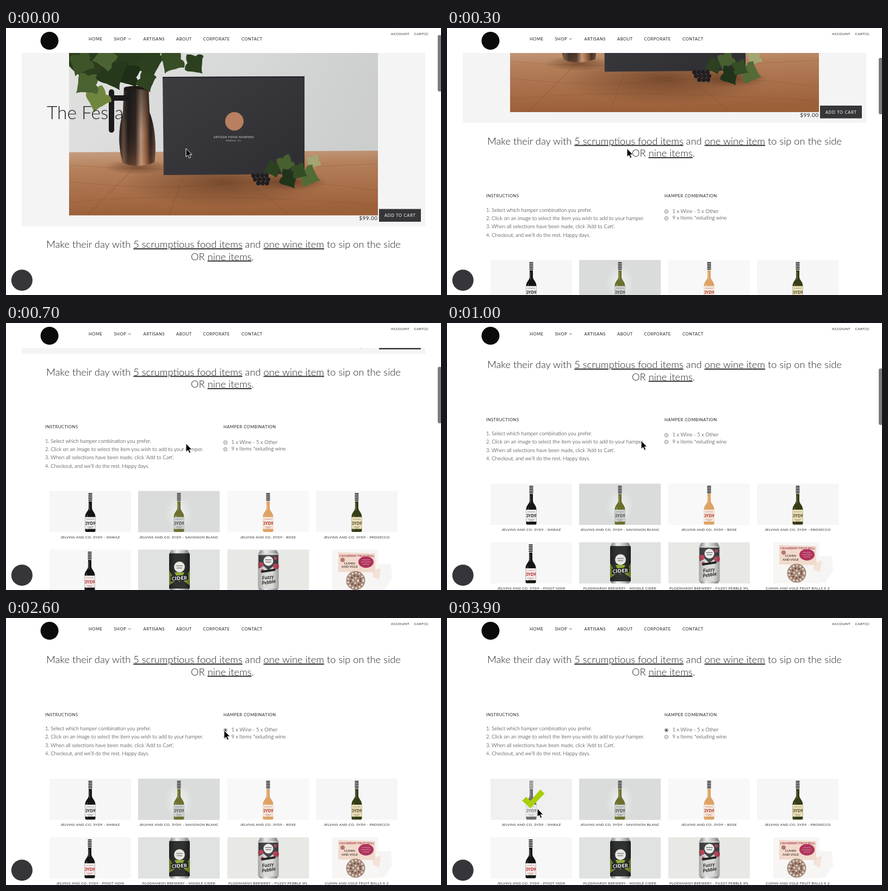
Write an HTML page that moves like this. It is 800 px wide and 492 px high and loops after 4000 ms.

```html
<!DOCTYPE html>
<html lang="en">
<head>
<meta charset="utf-8">
<title>Hamper shop</title>
<style>
  html, body { margin: 0; width: 100%; height: 100%; overflow: hidden; background: #fff; }
  svg { display: block; width: 800px; height: 492px; }
  text { font-family: Lato, sans-serif; fill: #222; white-space: pre; }
  .nav { font-size: 7.6px; letter-spacing: .5px; }
  .small { font-size: 6.5px; letter-spacing: .35px; }
  .mid { text-anchor: middle; }
  .body { font-size: 9.5px; font-weight: 300; }
  .body text { fill: #111; }
  .lead { font-size: 18.3px; font-weight: 300; text-anchor: middle; }
  .lead tspan { text-decoration: underline; text-decoration-thickness: 1px; text-decoration-skip-ink: none; }
  .title { font-size: 33.5px; font-weight: 300; }
  .price { font-size: 10px; letter-spacing: .5px; text-anchor: end; }
  .button { font-size: 7.5px; letter-spacing: .75px; fill: #fff; }
  .radio { fill: #dcdcdc; stroke: #8a8a8a; stroke-width: .8; }
  .glass { fill: var(--glass); }
  .mark { fill: var(--ink); font-size: 7.2px; font-weight: 900; text-anchor: middle; }
</style>
</head>
<body>
<svg viewBox="0 0 800 492">
  <defs>
    <linearGradient id="wall" x2="1" y2=".3">
      <stop offset="0" stop-color="#e0e0de"/><stop offset=".5" stop-color="#d8dada"/><stop offset="1" stop-color="#cbcecd"/>
    </linearGradient>
    <linearGradient id="wood" x2=".12" y2="1">
      <stop offset="0" stop-color="#c69f82"/><stop offset=".3" stop-color="#b47f5a"/><stop offset="1" stop-color="#9c6039"/>
    </linearGradient>
    <linearGradient id="copper">
      <stop offset="0" stop-color="#1d1a1a"/><stop offset=".12" stop-color="#6d5243"/><stop offset=".24" stop-color="#1f1b1b"/>
      <stop offset=".45" stop-color="#3a2921"/><stop offset=".6" stop-color="#d5ad90"/><stop offset=".74" stop-color="#9a6343"/>
      <stop offset=".86" stop-color="#241c19"/><stop offset="1" stop-color="#6f4b39"/>
    </linearGradient>
    <linearGradient id="dusk" x2="0" y2="1">
      <stop offset="0" stop-color="#17181a" stop-opacity=".65"/><stop offset=".6" stop-color="#17181a" stop-opacity=".15"/><stop offset="1" stop-color="#b0714c" stop-opacity=".35"/>
    </linearGradient>
    <linearGradient id="box" x2="1" y2="1">
      <stop offset="0" stop-color="#3d3d41"/><stop offset="1" stop-color="#2e2e32"/>
    </linearGradient>
    <linearGradient id="steel">
      <stop offset="0" stop-color="#777"/><stop offset=".35" stop-color="#eee"/><stop offset=".7" stop-color="#bbb"/><stop offset="1" stop-color="#777"/>
    </linearGradient>
    <linearGradient id="shade">
      <stop offset="0" stop-opacity=".35"/><stop offset=".3" stop-opacity="0"/><stop offset=".7" stop-opacity="0"/><stop offset="1" stop-opacity=".4"/>
    </linearGradient>
    <radialGradient id="glow">
      <stop offset="0" stop-color="#fff" stop-opacity=".6"/><stop offset="1" stop-color="#fff" stop-opacity="0"/>
    </radialGradient>
    <radialGradient id="shadow">
      <stop offset="0" stop-color="#4f2a14" stop-opacity=".55"/><stop offset="1" stop-color="#4f2a14" stop-opacity="0"/>
    </radialGradient>
    <clipPath id="photo"><path d="M116 30H684V345.5H116Z"/></clipPath>
    <path id="leaf" d="M0-15C5-12 7-8 8-5C13-6 16-3 17 2C12 3 10 8 6 11C4 13 1 16 0 20C-3 15-6 13-8 10C-11 7-15 5-16 0C-13-4-10-5-7-5C-6-9-4-13 0-15Z"/>
    <g id="bottle">
      <path class="glass" d="M-3 18V32C-4 38-9.5 40-9.5 48V73Q-9.5 75.5-7 75.5H7Q9.5 75.5 9.5 73V48C9.5 40 4 38 3 32V18Z"/>
      <path d="M-3.5 4H3.5V19H-3.5Z" fill="#f2f2f2"/>
      <path d="M0 4V19" stroke="#161616" stroke-width="7" stroke-dasharray="1.8 1.2"/>
      <path d="M-5.5 44V72M-1.5 22V36" stroke="#fff" stroke-width="1" opacity=".35"/>
      <path d="M-9.5 48H9.5V70H-9.5Z" fill="var(--label)"/>
      <path d="M-7 52H7M-6 66H6M-4 68H4" stroke="var(--ink)" stroke-width=".8" opacity=".55"/>
      <text class="mark" y="62">3YD9</text>
    </g>
    <g id="can">
      <path d="M-15 2H15L19 9V71L15 76H-15L-19 71V9Z" fill="var(--glass)"/>
      <path d="M-15 1H15L18 7H-18Z" fill="url(#steel)"/>
      <path d="M-18 72H18L15 76H-15Z" fill="url(#steel)"/>
    </g>
  </defs>

  <g id="page">
    <path d="M29 30H771V365.5H29Z" fill="#f4f4f4"/>
    <g clip-path="url(#photo)">
      <path d="M116 30H684V345.5H116Z" fill="url(#wall)"/>
      <path d="M116 229L684 226V345.5H116Z" fill="url(#wood)"/>
      <g fill="none" stroke="#7c4828" opacity=".25">
        <path d="M116 252Q300 270 684 250M116 283Q260 300 400 288T684 300M116 322Q300 300 684 325"/>
        <path d="M325 275L300 345M455 290L520 345M235 258L150 345" stroke-width="1.5"/>
      </g>
      <ellipse cx="400" cy="284" rx="190" ry="48" fill="url(#shadow)"/>
      <ellipse cx="240" cy="256" rx="60" ry="14" fill="url(#shadow)"/>
      <path d="M116 46H285Q270 78 232 82Q196 108 168 96Q140 98 116 70Z" fill="#2c3c1e"/>
      <g fill="#2c401f">
        <use href="#leaf" transform="translate(140 62) scale(1.5) rotate(25)" fill="#3d5528"/>
        <use href="#leaf" transform="translate(262 62) scale(1.7) rotate(-15)"/>
        <use href="#leaf" transform="translate(226 84) scale(1.6) rotate(60)" fill="#1f2e17"/>
        <use href="#leaf" transform="translate(345 64) scale(1.3) rotate(-40)"/>
        <use href="#leaf" transform="translate(307 58) scale(1.5) rotate(30)" fill="#374d25"/>
      </g>
      <path d="M217 110Q225 105 262 109L264 155C275 183 277 220 273 248Q242 259 215 249C206 220 206 185 215 155Z" fill="url(#copper)"/>
      <path d="M217 110Q225 105 262 109L264 155C275 183 277 220 273 248Q242 259 215 249C206 220 206 185 215 155Z" fill="url(#dusk)"/>
      <path d="M217 111Q240 103 262 110L263 116Q240 109 217 117Z" fill="#1e1917"/>
      <path d="M219 129H200M194 118V188" fill="none" stroke="#1c1a1a" stroke-linecap="round" stroke-width="10"/>
      <g fill="#70863f">
        <use href="#leaf" transform="translate(170 127) scale(1.5) rotate(15)"/>
        <use href="#leaf" transform="translate(152 101) scale(1.5) rotate(50)" fill="#4a6230"/>
        <use href="#leaf" transform="translate(193 80) scale(1.9) rotate(-25)" fill="#26391b"/>
        <use href="#leaf" transform="translate(185 56) scale(1.4) rotate(80)" fill="#4b6333"/>
        <use href="#leaf" transform="translate(257 96) scale(1.2) rotate(-20)" fill="#2e4320"/>
      </g>
      <path d="M288 90L549 89V269L290 271Z" fill="url(#box)"/>
      <path d="M288 91L549 90" stroke="#222226" stroke-width="2"/>
      <circle cx="420" cy="172" r="17" fill="#b87f60"/>
      <g class="mid" font-weight="700">
        <text x="419" y="203" font-size="5" letter-spacing=".6" style="fill:#bbb">ARTISAN FOOD HAMPERS</text>
        <text x="419" y="208.5" font-size="3.5" letter-spacing=".5" style="fill:#aaa">FERNLEA, VIC.</text>
      </g>
      <ellipse cx="520" cy="284" rx="70" ry="16" fill="url(#shadow)"/>
      <g fill="#2d4120">
        <use href="#leaf" transform="translate(492 259) rotate(70)"/>
        <use href="#leaf" transform="translate(514 248) scale(1.1) rotate(20)" fill="#48602f"/>
        <use href="#leaf" transform="translate(566 245) scale(.9) rotate(30)" fill="#a3a673"/>
        <use href="#leaf" transform="translate(519 275) scale(1.2) rotate(-30)" fill="#22331b"/>
        <use href="#leaf" transform="translate(554 272) scale(1.3) rotate(-70)" fill="#526b37"/>
        <use href="#leaf" transform="translate(537 263) rotate(-60)" fill="#354d25"/>
      </g>
      <path d="M455 272H486M458 279H490M464 286H484" stroke="#1e1e22" stroke-width="8" stroke-linecap="round" stroke-dasharray="0 8"/>
    </g>
    <text class="title" x="75" y="168">The Festal</text>
    <text class="price" x="683.5" y="354">$99.00</text>
    <path d="M686 333.5H763V357H686Z" fill="#363639"/>
    <text class="button" x="696" y="348" style="fill:#fff">ADD TO CART</text>

    <text class="lead" x="400" y="405">Make their day with <tspan>5 scrumptious food items</tspan> and <tspan>one wine item</tspan> to sip on the side</text>
    <text class="lead" x="398" y="427.5">OR <tspan>nine items</tspan>.</text>

    <text class="nav" x="72" y="502.6">INSTRUCTIONS</text>
    <g class="body">
      <text x="72" y="529">1. Select which hamper combination you prefer.</text>
      <text x="72" y="544.4">2. Click on an image to select the item you wish to add to your hamper.</text>
      <text x="72" y="559.8">3. When all selections have been made, click ‘Add to Cart’.</text>
      <text x="72" y="575">4. Checkout, and we’ll do the rest. Happy days.</text>
      <text x="414.5" y="531">1 x Wine - 5 x Other</text>
      <text x="414.5" y="543.6">9 x Items *exluding wine</text>
    </g>
    <text class="nav" x="400" y="502.6">HAMPER COMBINATION</text>
    <circle class="radio" cx="403.5" cy="528.7" r="3.4"/>
    <circle class="radio" cx="403.5" cy="541.2" r="3.4"/>
    <circle id="dot" cx="403.5" cy="528.7" r="1.8" fill="#333"/>

    <g transform="translate(80 618)">
      <path d="M0 0H150V76H0Z" fill="#f6f6f6"/>
      <use href="#bottle" x="75" style="--glass:#151515;--label:#eee;--ink:#333"/>
      <path id="veil" d="M0 0H150V76H0Z" fill="#e6e6e6" opacity=".42"/>
      <path id="tick" d="M58 40.5L65.5 33.5L73.5 41L91.5 20L99.5 27.5L73.5 54.5Z" fill="#a8d00a"/>
    </g>
    <g transform="translate(243 618)">
      <path d="M0 0H150V76H0Z" fill="#d9dcdb"/>
      <ellipse cx="75" cy="42" rx="26" ry="34" fill="url(#glow)"/>
      <use href="#bottle" x="75" style="--glass:#6c702f;--label:#ccd0cf;--ink:#555"/>
    </g>
    <g transform="translate(407 618)">
      <path d="M0 0H150V76H0Z" fill="#f8f8f8"/>
      <use href="#bottle" x="75" style="--glass:#dda265;--label:#f3e6dc;--ink:#b5402f"/>
    </g>
    <g transform="translate(570 618)">
      <path d="M0 0H150V76H0Z" fill="#f6f6f6"/>
      <use href="#bottle" x="75" style="--glass:#363d18;--label:#e9dfb9;--ink:#5b5130"/>
    </g>
    <g transform="translate(80 726)">
      <path d="M0 0H150V76H0Z" fill="#f7f7f7"/>
      <use href="#bottle" x="74" style="--glass:#151515;--label:#f1ecec;--ink:#bd2c2c"/>
    </g>
    <g transform="translate(243 726)">
      <path d="M0 0H150V76H0Z" fill="#dfe2e1"/>
      <g transform="translate(76 0)">
        <use href="#can" style="--glass:#303232"/>
        <path d="M-19 38L-8 58L-19 66ZM19 38L8 58L19 66ZM-9 42L0 60L9 42Z" fill="#8fae35"/>
        <circle cy="32" r="10" fill="#e6e6e2"/>
        <path d="M-6 30H6M-5 34H5" stroke="#555" stroke-width="1.2"/>
        <path d="M-16 49L16 46V56L-16 59Z" fill="#262828"/>
        <text class="mid" y="56" font-size="9" font-weight="900" letter-spacing=".5" transform="rotate(-4 0 53)" style="fill:#f2f2f2">CIDER</text>
        <path d="M-19 7H19V72H-19Z" fill="url(#shade)"/>
      </g>
    </g>
    <g transform="translate(407 726)">
      <path d="M0 0H150V76H0Z" fill="#e8e8e5"/>
      <g transform="translate(75.5 0)">
        <use href="#can" style="--glass:#d9d9d7"/>
        <path d="M-18 10H18V36L9 31L0 38L-9 30L-18 35Z" fill="#46484a"/>
        <g fill="#c94e63">
          <circle cx="-14" cy="28" r="5"/><circle cx="14" cy="31" r="5.5"/><circle cx="-11" cy="39" r="3"/><circle cx="13" cy="16" r="3"/>
        </g>
        <circle cy="21" r="9" fill="#ecece9"/>
        <path d="M-6 19H6M-5 23H5" stroke="#444" stroke-width="1.2"/>
        <path d="M-13 39L13 35V39L-13 43Z" fill="#222"/>
        <g class="mid" font-size="9" font-weight="700" font-style="italic" transform="rotate(-9 0 56)">
          <text y="54">Fuzzy</text><text y="63">Pebble</text>
        </g>
        <path d="M-19 7H19V72H-19Z" fill="url(#shade)" opacity=".7"/>
      </g>
    </g>
    <g transform="translate(570 726)">
      <path d="M30 0H115V76H30Z" fill="#f7f6f5"/>
      <path d="M115 26H138L140 52L126 74H115Z" fill="#f6f5f4"/>
      <path d="M105 38L119 34L116 56L104 50Z" fill="#f4e2d8"/>
      <path d="M41 5L109 7V42L41 41Z" fill="#f1dacd"/>
      <g class="mid" font-weight="700">
        <text x="75" y="13" font-size="5.6" style="fill:#ae4553">CRANBERRY FRUIT BALL</text>
        <text x="62" y="27" font-size="6" style="fill:#5b4641">CUMIN</text>
        <text x="62" y="33.5" font-size="6" style="fill:#5b4641">AND VOLE</text>
      </g>
      <circle cx="49" cy="19" r="4" fill="#b07a6c"/>
      <ellipse cx="92" cy="23" rx="14" ry="10.5" fill="#af345c"/>
      <path d="M85 19H99M83 23H101M86 27H98" stroke="#d78ca4"/>
      <circle cx="73" cy="57" r="17.5" fill="#a58a7a"/>
      <g fill="none" stroke-width="3" stroke-dasharray="2.5 4">
        <circle cx="73" cy="57" r="14" stroke="#eee4dc"/>
        <circle cx="73" cy="57" r="9" stroke="#6b4438"/>
        <circle cx="73" cy="57" r="4.5" stroke="#e9ddd4"/>
      </g>
    </g>
    <g class="small mid">
      <text x="155" y="705">JELVINS AND CO. 3YD9 - SHIRAZ</text>
      <text x="318" y="705">JELVINS AND CO. 3YD9 - SAVIGNON BLANC</text>
      <text x="482" y="705">JELVINS AND CO. 3YD9 - ROSE</text>
      <text x="645" y="705">JELVINS AND CO. 3YD9 - PROSECCO</text>
      <text x="155" y="813">JELVINS AND CO. 3YD9 - PINOT NOIR</text>
      <text x="318" y="813">PLODMARSH BREWERY - MINDLE CIDER</text>
      <text x="482" y="813">PLODMARSH BREWERY - FUZZY PEBBLE IPL</text>
      <text x="645" y="813">CUMIN AND VOLE FRUIT BALLS X 2</text>
    </g>
  </g>

  <path d="M0 0H800V46H0Z" fill="#fff"/>
  <circle cx="80" cy="23.5" r="16.5" fill="#0b0b0b"/>
  <g class="nav">
    <text x="152" y="22.8">HOME</text>
    <text x="198.5" y="22.8">SHOP</text>
    <text x="252.5" y="22.8">ARTISANS</text>
    <text x="313" y="22.8">ABOUT</text>
    <text x="362.5" y="22.8">CORPORATE</text>
    <text x="433" y="22.8">CONTACT</text>
  </g>
  <path d="M225 19L227.3 21.2L229.6 19" fill="none" stroke="#444" stroke-width=".9"/>
  <text class="small" x="708" y="13.3">ACCOUNT</text>
  <text class="small" x="750.5" y="13.3">CART(1)</text>
  <circle cx="29.3" cy="464.7" r="19.5" fill="#36363a"/>
  <rect id="thumb" x="794" y="13" width="7" height="104" rx="3" fill="#7b7b7b"/>
  <path id="cursor" d="M0 0V15.6L3.6 12.3L6 17.8L8.7 16.6L6.3 11.3H11Z" fill="#000" stroke="#fff" stroke-width="1"/>
</svg>
<script>
  const LOOP = 4000, STEP = 100;
  const scrollSteps = [0, 54, 130, 190.5, 224, 252, 283, 308.5, 318, 322];
  // time, x, y
  const path = [[800, 331, 222], [1300, 405, 207], [2000, 405, 207], [2300, 401, 207], [2700, 401, 207], [3500, 166, 351]];
  const $ = id => document.getElementById(id);
  const page = $('page'), thumb = $('thumb'), cursor = $('cursor');
  const clamp = v => Math.min(1, Math.max(0, v));
  const ease = v => v * v * (3 - 2 * v);
  const show = (id, on) => $(id).setAttribute('visibility', on ? 'visible' : 'hidden');
  const move = (el, x, y) => el.setAttribute('transform', `translate(${x} ${y})`);

  function cursorAt(t) {
    let [start, x, y] = path[0];
    for (const [end, nx, ny] of path.slice(1)) {
      const k = ease(clamp((t - start) / (end - start)));
      x += (nx - x) * k;
      y += (ny - y) * k;
      start = end;
    }
    return [x, y];
  }

  function draw(now) {
    const t = Math.floor(now % LOOP / STEP) * STEP;
    const scroll = scrollSteps[Math.min(t / STEP, scrollSteps.length - 1)];
    const [x, y] = cursorAt(t);
    move(page, 0, -scroll);
    move(thumb, 0, scroll * .22);
    thumb.setAttribute('opacity', clamp((1650 - t) / 350));
    move(cursor, x, y);
    show('dot', t >= 2500);
    show('veil', t > 2700 && x < 230 && y > 296);
    show('tick', t >= 3800);
    requestAnimationFrame(draw);
  }
  draw(0);
</script>
</body>
</html>
```
